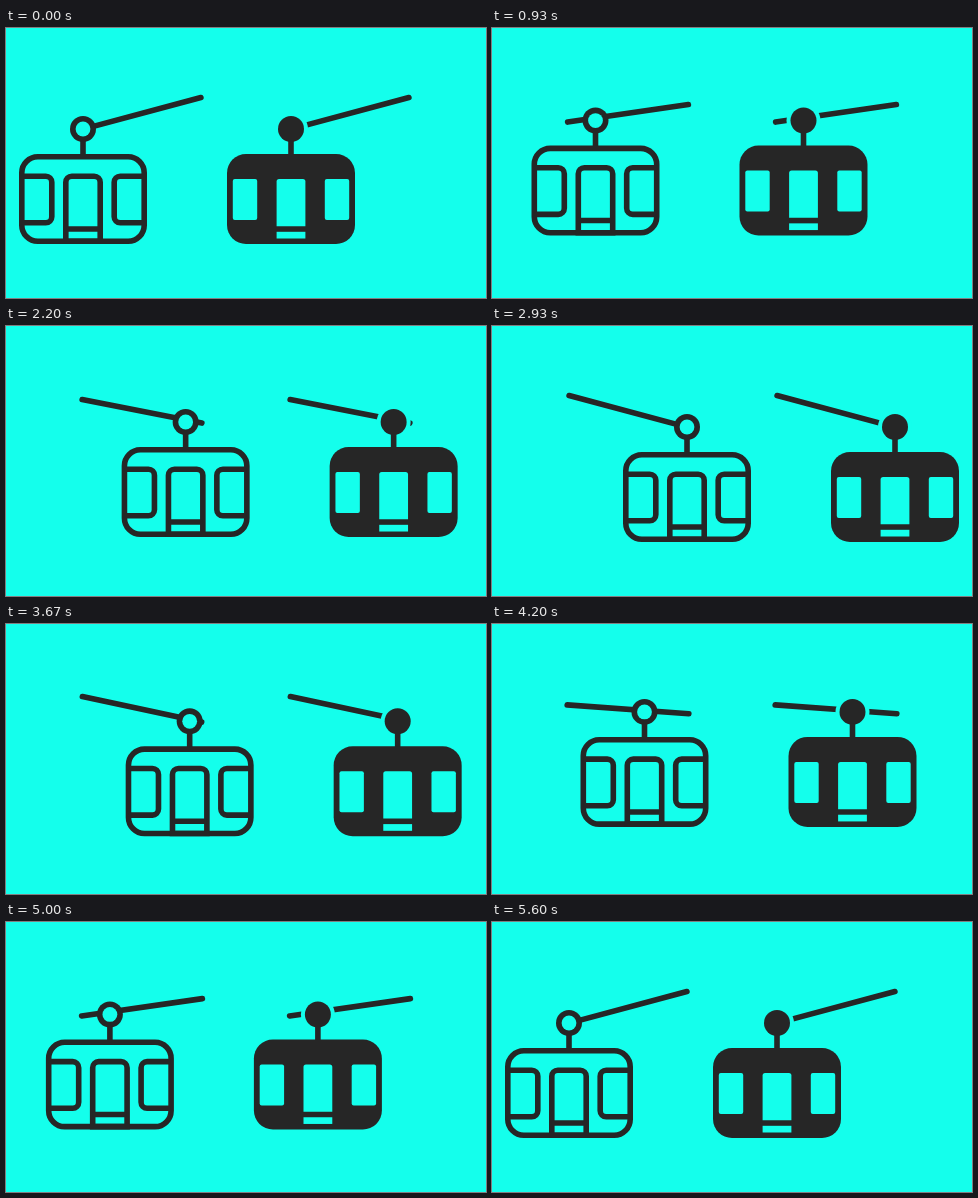
Recreate the animation shown at these times as an HTML page with a canvas. Size 480 by 270 pixels, loop 5990 ms.

```html
<!DOCTYPE html>
<html lang="en">
<head>
<meta charset="utf-8">
<title>Cable car icons</title>
<style>
  html, body { margin: 0; width: 100%; height: 100%; overflow: hidden; background: #14ffec; }
  canvas { display: block; width: 480px; height: 270px; }
</style>
</head>
<body>
<canvas id="stage"></canvas>
<script>
const BG = '#14ffec', INK = '#262626';
const LOOP = 5990, STEP = 1000 / 15;
const RIDE = 2140, OUT_START = 400, BACK_START = 3400;
const LINE = 5.6;

const canvas = document.getElementById('stage');
const ctx = canvas.getContext('2d');
const scale = window.devicePixelRatio || 1;
canvas.width = 480 * scale;
canvas.height = 270 * scale;

// Cubic bezier (0.1, 0, 0.9, 1): nearly linear with short soft ends.
function ease(x) {
  if (x <= 0) return 0;
  if (x >= 1) return 1;
  let lo = 0, hi = 1;
  for (let i = 0; i < 24; i++) {
    const s = (lo + hi) / 2, r = 1 - s;
    if (0.3 * s * r * r + 2.7 * s * s * r + s * s * s < x) lo = s; else hi = s;
  }
  return lo * lo * (3 - 2 * lo);
}

// Ride position: -1 at the left end of the rope, 1 at the right end.
function position(time) {
  const out = ease((time - OUT_START) / RIDE);
  const back = ease((time - BACK_START) / RIDE);
  return 2 * (out - back) - 1;
}

function disc(radius, color) {
  ctx.fillStyle = color;
  ctx.beginPath();
  ctx.arc(0, 0, radius, 0, Math.PI * 2);
  ctx.fill();
}

function box(x, y, w, h, radius) {
  ctx.beginPath();
  ctx.roundRect(x, y, w, h, radius);
}

function line(x1, y1, x2, y2) {
  ctx.beginPath();
  ctx.moveTo(x1, y1);
  ctx.lineTo(x2, y2);
  ctx.stroke();
}

function drawRope(p) {
  ctx.save();
  ctx.translate(136, 85.3);
  ctx.rotate(p * Math.PI / 12);
  ctx.lineCap = 'round';
  line(-61, 0, 61, 0);
  ctx.restore();
}

function drawOutlineCar() {
  disc(13, INK);
  disc(7.4, BG);
  line(0, 12, 0, 26);
  box(-61.2, 27.8, 122.4, 84.4, 16);
  ctx.stroke();
  box(-17.2, 47.2, 34.4, 65, [6, 6, 0, 0]);
  ctx.stroke();
  line(-17, 100, 17, 100);
  for (const side of [-1, 1]) {
    ctx.beginPath();
    ctx.moveTo(side * 61, 47.2);
    ctx.arcTo(side * 31.2, 47.2, side * 31.2, 60, 6);
    ctx.arcTo(side * 31.2, 93.8, side * 40, 93.8, 6);
    ctx.lineTo(side * 61, 93.8);
    ctx.stroke();
  }
}

function drawSolidCar() {
  disc(17, BG);
  disc(13, INK);
  line(0, 12, 0, 26);
  box(-64, 25, 128, 90, 19);
  ctx.fill();
  ctx.fillStyle = BG;
  box(-58.2, 50, 24.4, 41, 2);
  ctx.fill();
  box(33.8, 50, 24.4, 41, 2);
  ctx.fill();
  box(-14.4, 50, 28.8, 47.2, [2.5, 2.5, 0, 0]);
  ctx.fill();
  ctx.fillRect(-14.4, 102.8, 28.8, 6.7);
}

function drawIcon(offset, p, drawCar) {
  ctx.save();
  ctx.translate(offset, 0);
  ctx.strokeStyle = INK;
  ctx.lineWidth = LINE;
  drawRope(p);
  ctx.translate(136 + 59 * p, 84 + 17 * Math.pow(Math.abs(p), 1.15));
  drawCar();
  ctx.restore();
}

const start = performance.now();

function render() {
  const time = (performance.now() - start) % LOOP;
  const p = position(Math.floor((time + 4) / STEP) * STEP);
  ctx.setTransform(scale, 0, 0, scale, 0, 0);
  ctx.fillStyle = BG;
  ctx.fillRect(0, 0, 480, 270);
  drawIcon(0, p, drawOutlineCar);
  drawIcon(208, p, drawSolidCar);
  requestAnimationFrame(render);
}

render();
</script>
</body>
</html>
```
